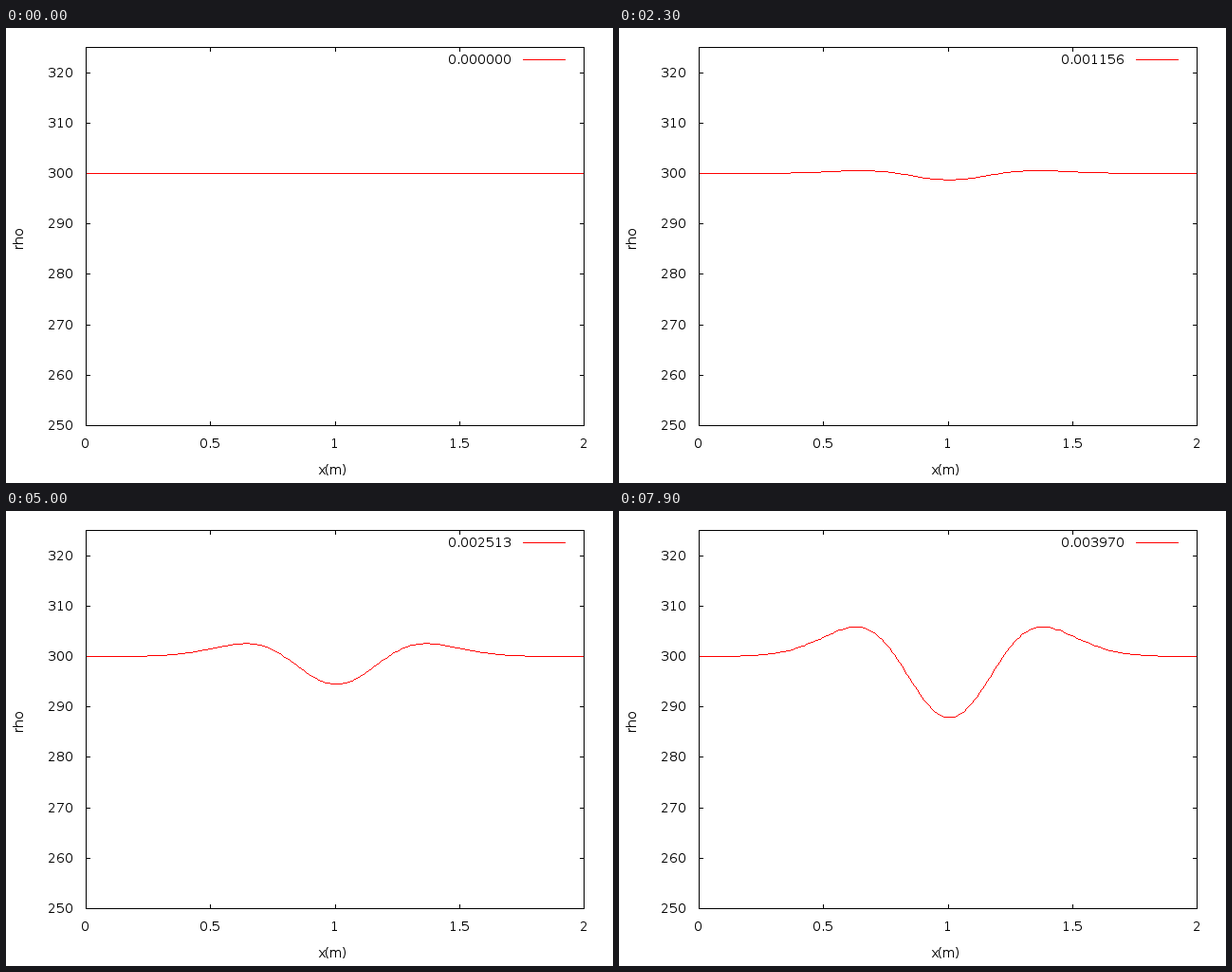
Animation, 640 px wide and 480 px high, one loop 8000 ms. Source, as a matplotlib script:

```python
import numpy as np
import matplotlib.pyplot as plt
from matplotlib.animation import FuncAnimation
from matplotlib.collections import PolyCollection

W, H, DPI = 640, 480, 100
PX = 72 / DPI                      # one pixel in points
LEFT, RIGHT, TOP, BOTTOM = 84, 609, 20, 419
FRAMES, STEP = 80, 0.01 / 199      # simulated seconds per frame
RHO0, SIGMA, AMP, RATE, STEEP = 300, 0.205, 44.4, 0.34, 225
RED = "#ff0000"

# Hinted glyphs on whole-pixel advances, as in plain bitmap plots.
plt.rcParams.update({"font.family": "DejaVu Sans", "font.size": 14 * PX,
                     "text.hinting": "native", "text.hinting_factor": 1})


def px(x):
    return LEFT + x / 2 * (RIGHT - LEFT)


def py(rho):
    return BOTTOM - (rho - 250) / 75 * (BOTTOM - TOP)


def density(x, n):
    """A pressure bump splits into two waves and leaves a density dip."""
    s = (x - 200 / 199) / SIGMA
    shift = np.sqrt(2 * RATE) * n / (FRAMES - 1)
    bump = lambda v: np.exp(-v * v / 2)
    q = AMP * ((bump(s - shift) + bump(s + shift)) / 2 - bump(s))
    return RHO0 + q / (1 - q / STEEP)


def pixels(xs, ys):
    """Pixels of a one-pixel polyline through whole-pixel vertices."""
    pts = [(xs[0], ys[0])]
    for x0, y0, x1, y1 in zip(xs, ys, xs[1:], ys[1:]):
        n = int(max(abs(x1 - x0), abs(y1 - y0)))
        t = np.arange(1, n + 1) / n
        pts += zip(np.floor(x0 + t * (x1 - x0) + 0.5),
                   np.floor(y0 + t * (y1 - y0) + 0.5))
    return np.array(pts)


grid = np.arange(200) * 2 / 199
cols = np.floor(px(grid) + 0.5)
square = np.array([(0, 0), (1, 0), (1, 1), (0, 1)])

fig = plt.figure(figsize=(W / DPI, H / DPI), dpi=DPI, facecolor="white")
ax = fig.add_axes([0, 0, 1, 1])
ax.set_xlim(0, W)
ax.set_ylim(H, 0)
ax.axis("off")


def stroke(x, y, color="black", z=1):
    ax.plot(np.asarray(x) + 0.5, np.asarray(y) + 0.5, color=color,
            lw=PX, antialiased=False, snap=False, zorder=z,
            solid_capstyle="projecting", solid_joinstyle="miter")


def label(x, y, text, ha="center", **kw):
    return ax.text(x, y, text, ha=ha, va="baseline", color="black", **kw)


for rho in range(250, 321, 10):
    y = int(round(py(rho)))
    stroke([LEFT, LEFT + 4], [y, y])
    stroke([RIGHT - 4, RIGHT], [y, y])
    label(71, y + 5, str(rho), "right")

for x in (0, 0.5, 1, 1.5, 2):
    c = int(px(x) + 0.5)
    stroke([c, c], [BOTTOM - 4, BOTTOM])
    stroke([c, c], [TOP, TOP + 4])
    label(c, 443, f"{x:g}")

stroke([LEFT, RIGHT, RIGHT, LEFT, LEFT], [TOP, TOP, BOTTOM, BOTTOM, TOP], z=5)
stroke([545, 589], [33, 33], RED)
label(344, 471, "x(m)")
label(18, 220.5, "rho", rotation=90, rotation_mode="anchor")

clock = label(533, 38, "", "right")
curve = PolyCollection([], facecolors=RED, linewidths=0, antialiaseds=False,
                       zorder=3)
curve.set_snap(False)
ax.add_collection(curve, autolim=False)


def draw(n):
    clock.set_text(f"{n * STEP:.6f}")
    rows = np.floor(py(density(grid, n)) + 0.5)
    curve.set_verts(pixels(cols, rows)[:, None] + square)
    return clock, curve


anim = FuncAnimation(fig, draw, frames=FRAMES, interval=100,
                     repeat=True, repeat_delay=0)
plt.show()
```
